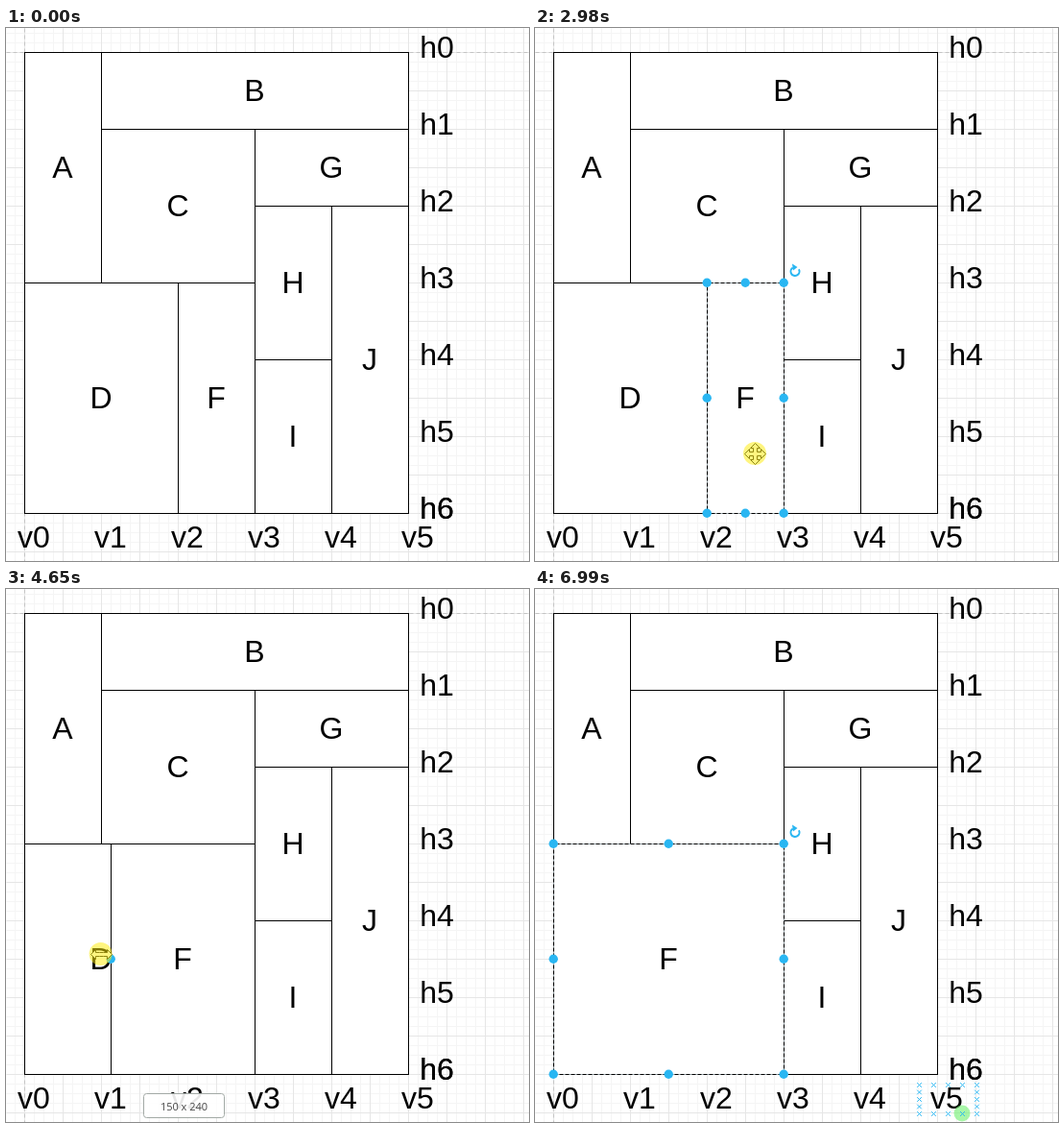
These frames come from a looping animation (545 px wide and 555 px high, 7070 ms). An HTML page with a canvas:

```html
<!DOCTYPE html>
<html lang="en">
<head>
<meta charset="utf-8">
<title>Resizing a rectangle</title>
<style>
  html, body { margin: 0; width: 100%; height: 100%; overflow: hidden; background: #fff; }
  canvas { display: block; }
</style>
</head>
<body>
<canvas id="stage" width="545" height="555"></canvas>
<script>
const ctx = document.getElementById('stage').getContext('2d');
const LOOP = 7070, LEFT = 19, TOP = 25, UNIT = 80;
const BLUE = '#29b6f2';

// Rectangles in layout units: name, column, row, width, height.
const BOXES = [
  ['A', 0, 0, 1, 3], ['B', 1, 0, 4, 1], ['C', 1, 1, 2, 2],
  ['G', 3, 1, 2, 1], ['H', 3, 2, 1, 2], ['I', 3, 4, 1, 2],
  ['J', 4, 2, 1, 4], ['D', 0, 3, 2, 3]
].map(([name, c, r, w, h]) =>
  ({ name, x: LEFT + c * UNIT, y: TOP + r * UNIT, w: w * UNIT, h: h * UNIT }));
const D = BOXES[BOXES.length - 1];
const V5 = { x: 400, y: 516, w: 60, h: 30 };

// Pointer moves: first step, last step, steps, end x, end y, left edge of F.
const START = { x: 527, y: 571, edge: 179 };
const MOVES = [
  [600, 860, 5, 238, 430, 179],
  [1050, 1250, 4, 118, 430, 179],
  [2590, 2840, 5, 229, 443, 179],
  [3190, 3470, 5, 185, 379, 179],
  [3670, 3800, 3, 185, 382, 179],
  [4260, 4450, 4, 126, 381, 139],
  [4520, 4920, 6, 44, 378, 49],
  [4990, 4990, 1, 40, 377, 39],
  [5060, 5320, 5, 30, 378, 39],
  [5460, 5720, 4, 22, 377, 19],
  [6120, 6190, 2, 106, 400, 19],
  [6390, 6530, 3, 445, 546, 19]
];

const between = (t, a, b) => t >= a && t < b;

function pointerAt(t) {
  let p = START;
  for (const [t0, t1, n, x, y, edge] of MOVES) {
    if (t < t0) break;
    const gap = (t1 - t0) / (n - 1) || 1;
    const k = Math.min(n, Math.floor((t - t0) / gap + 1e-6) + 1) / n;
    const mix = (a, b) => a + (b - a) * k;
    p = { x: mix(p.x, x), y: mix(p.y, y), edge: mix(p.edge, edge) };
  }
  return p;
}

function line(x1, y1, x2, y2, color, dash = []) {
  ctx.strokeStyle = color;
  ctx.lineWidth = 1;
  ctx.setLineDash(dash);
  ctx.beginPath();
  ctx.moveTo(x1 + .5, y1 + .5);
  ctx.lineTo(x2 + .5, y2 + .5);
  ctx.stroke();
  ctx.setLineDash([]);
}

function disc(x, y, r, color) {
  ctx.fillStyle = color;
  ctx.beginPath();
  ctx.arc(x, y, r, 0, 7);
  ctx.fill();
}

function label(text, x, y) {
  ctx.font = '32px "Liberation Sans", Arial, sans-serif';
  ctx.textAlign = 'center';
  ctx.fillStyle = '#000';
  ctx.fillText(text, x, y + 11);
}

function drawGrid() {
  ctx.fillStyle = '#fff';
  ctx.fillRect(0, 0, 545, 555);
  for (const [step, color] of [[10, '#f5f5f5'], [40, '#e6e6e6']]) {
    for (let x = LEFT % step; x < 545; x += step) line(x, 0, x, 555, color);
    for (let y = TOP % step; y < 555; y += step) line(0, y, 545, y, color);
  }
  line(0, TOP, 545, TOP, '#c4c4c4', [4, 3]);
  line(LEFT, 0, LEFT, 555, '#c4c4c4', [4, 3]);
}

function drawBox({ name, x, y, w, h }) {
  ctx.fillStyle = '#fff';
  ctx.fillRect(x, y, w, h);
  ctx.strokeStyle = '#000';
  ctx.lineWidth = 1;
  ctx.strokeRect(x + .5, y + .5, w, h);
  label(name, x + w / 2, y + h / 2);
}

function drawAxes() {
  for (let i = 0; i < 7; i++) {
    label('h' + i, 449, 20 + i * UNIT);
    if (i < 6) label('v' + i, 29 + i * UNIT, 530);
  }
  label('h6', 449, 500);
}

function cross(x, y) {
  ctx.strokeStyle = BLUE;
  ctx.lineWidth = 1;
  ctx.beginPath();
  for (const s of [-1, 1]) {
    ctx.moveTo(x - 2.3, y - 2.3 * s);
    ctx.lineTo(x + 2.3, y + 2.3 * s);
  }
  ctx.stroke();
}

// Calls fn on each outline point when both sides are split into n parts.
function outline({ x, y, w, h }, n, fn) {
  for (let i = 0; i <= n; i++)
    for (let j = 0; j <= n; j++)
      if (i % n === 0 || j % n === 0) fn(x + w * i / n, y + h * j / n);
}

function drawHover(box) {
  outline(box, 4, (x, y) => {
    ctx.fillStyle = '#fff';
    ctx.fillRect(x - 1.5, y - 1.5, 4, 4);
    cross(x + .5, y + .5);
  });
}

function drawSelection(box) {
  const { x, y, w, h } = box;
  ctx.strokeStyle = '#a8b4ba';
  ctx.lineWidth = 1;
  ctx.setLineDash([2, 4]);
  ctx.strokeRect(x + .5, y + .5, w, h);
  ctx.setLineDash([]);
  outline(box, 2, (hx, hy) => disc(hx + .2, hy + .2, 4.7, BLUE));

  const rx = x + w + 12, ry = y - 11.5;
  ctx.strokeStyle = BLUE;
  ctx.lineWidth = 2;
  ctx.beginPath();
  ctx.arc(rx, ry, 4.5, -.5, 4.2);
  ctx.stroke();
  ctx.fillStyle = BLUE;
  ctx.beginPath();
  ctx.moveTo(rx - 3, ry - 8);
  ctx.lineTo(rx + 2.5, ry - 4.5);
  ctx.lineTo(rx - 2, ry - 1);
  ctx.fill();
}

function drawTooltip(box) {
  const x = Math.round(box.x + box.w / 2) - 41;
  ctx.fillStyle = 'rgba(255,255,255,.9)';
  ctx.strokeStyle = '#a3aaa6';
  ctx.lineWidth = 1;
  ctx.beginPath();
  ctx.roundRect(x + .5, 525.5, 84, 25, 3);
  ctx.fill();
  ctx.stroke();
  ctx.font = '11px "Open Sans", sans-serif';
  ctx.textAlign = 'center';
  ctx.fillStyle = '#444';
  ctx.fillText(box.w + ' x ' + box.h, x + 42.5, 543);
}

// Outline of arrows pointing in the given number of directions.
function drawCursor(x, y, arms) {
  ctx.save();
  ctx.translate(Math.round(x) + .5, Math.round(y) + .5);
  ctx.beginPath();
  for (let i = 0; i < arms; i++) {
    const a = i * 2 * Math.PI / arms, c = Math.cos(a), s = Math.sin(a);
    for (const [u, v] of [[2, -2], [6, -2], [6, -5], [11, 0], [6, 5], [6, 2], [2, 2]])
      ctx.lineTo(u * c - v * s, u * s + v * c);
  }
  ctx.closePath();
  ctx.fillStyle = '#fff';
  ctx.strokeStyle = '#222';
  ctx.lineWidth = 1;
  ctx.fill();
  ctx.stroke();
  ctx.restore();
}

function draw(t) {
  const p = pointerAt(t);
  const edge = LEFT + Math.round((p.edge - LEFT) / 10) * 10;
  const F = { name: 'F', x: edge, y: 265, w: 259 - edge, h: 240 };
  const dragging = between(t, 4260, 5930);

  drawGrid();
  BOXES.forEach(drawBox);
  drawBox(F);
  drawAxes();

  if (between(t, 1650, 2650) || between(t, 5930, 6390)) {
    ctx.fillStyle = '#d4effc';
    ctx.fillRect(0, 383, 11, 4);
  }
  if (between(t, 800, 2980) && p.x < 259) drawHover(p.x < 179 ? D : F);
  if (t >= 2980 && !dragging) drawSelection(F);
  if (dragging) {
    disc(edge + .2, 385.2, 4.7, BLUE);
    drawTooltip(F);
  }
  if (t >= 6530) {
    drawHover(V5);
    disc(445, 546, 8.5, 'rgba(110,240,110,.6)');
    cross(445.5, 546.5);
  } else if (t >= 600) {
    drawCursor(p.x, p.y, between(t, 3400, 6120) ? 2 : 4);
  }
  if (dragging || between(t, 2980, 3120)) disc(p.x, p.y, 12, 'rgba(255,236,0,.5)');
}

const begin = performance.now();
function tick() {
  draw((performance.now() - begin) % LOOP);
  requestAnimationFrame(tick);
}
tick();
</script>
</body>
</html>
```
